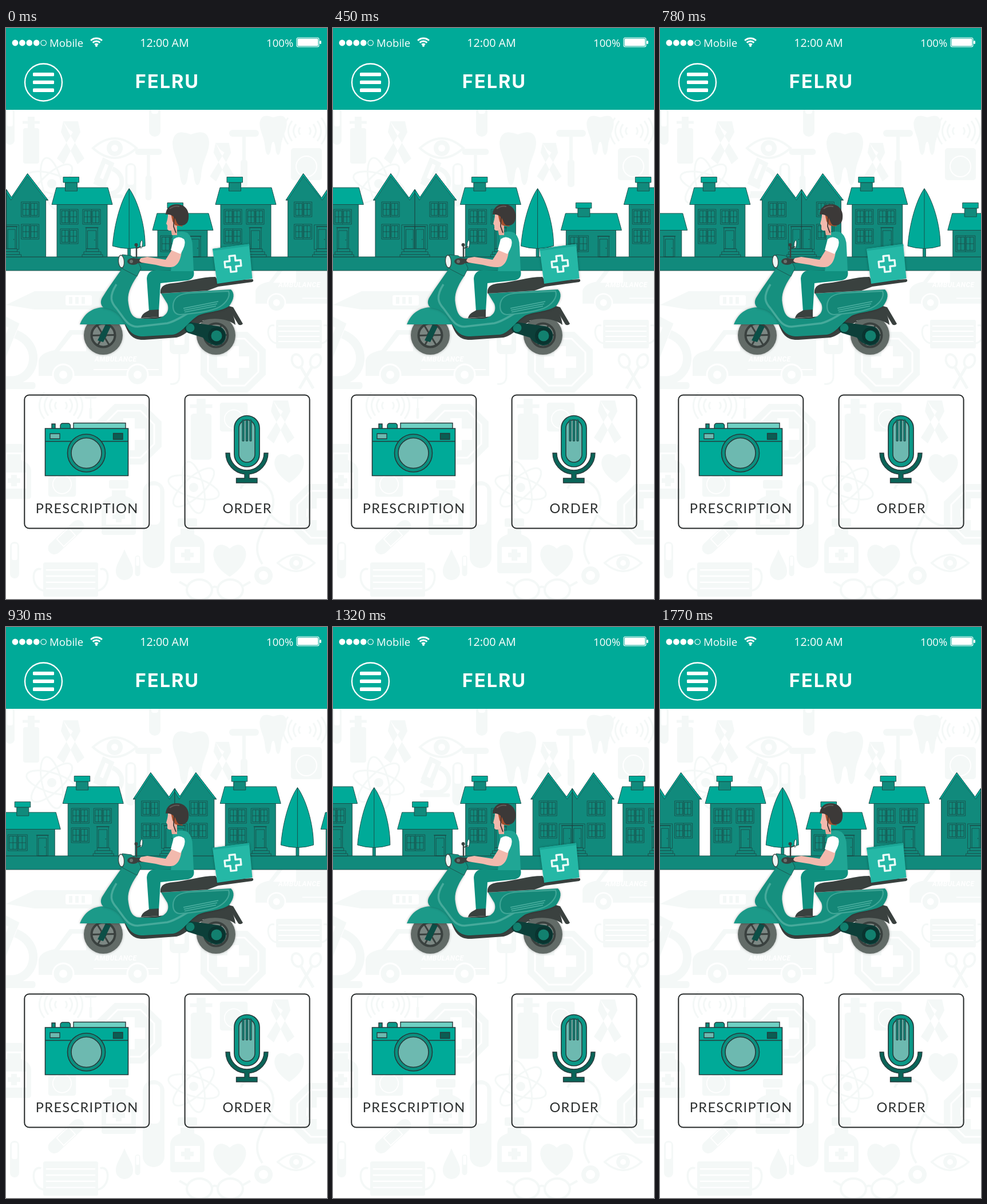
Write an HTML page with a canvas that moves like this. It is 561 by 998 pixels and loops after 1.8 s.

```html
<!DOCTYPE html>
<html lang="en">
<head>
<meta charset="utf-8">
<title>Delivery</title>
<style>
html, body { margin: 0; width: 100%; height: 100%; overflow: hidden; background: #fff; }
canvas, svg { position: absolute; left: 0; top: 0; width: 561px; height: 998px; display: block; }
.status { font: 18.6px "Open Sans", "Noto Sans", sans-serif; fill: #fff; }
.clock { font-size: 19.7px; }
.title { font: 700 32.5px Inter, sans-serif; fill: #fff; letter-spacing: 2px; }
.label { font: 23.6px Lato, sans-serif; fill: #2c2f2f; letter-spacing: 1.3px; }
.van { font: italic 700 12px Roboto, sans-serif; fill: #fff; letter-spacing: .4px; }
</style>
</head>
<body>
<canvas id="c" width="561" height="998"></canvas>
<svg viewBox="0 0 561 998">
  <text class="status" x="76" y="33">Mobile</text>
  <text class="status clock" x="277" y="33" text-anchor="middle">12:00 AM</text>
  <text class="status" x="455" y="33">100%</text>
  <text class="title" x="282" y="105" text-anchor="middle">FELRU</text>
  <text class="label" x="141.7" y="848" text-anchor="middle">PRESCRIPTION</text>
  <text class="label" x="421.7" y="847.5" text-anchor="middle">ORDER</text>
  <text class="van" x="155" y="583">AMBULANCE</text>
  <text class="van" x="476" y="453">AMBULANCE</text>
</svg>
<script>
const W = 561, H = 998, STEP = 30, FRAMES = 60, SPEED = 560 / 59;
const TEAL = '#00aa98', WALL = '#118a7c', INK = '#1b4845', DARK = '#3a413f';
const BODY = '#16907f', PALE = '#f4f8f7', GLASS = '#6db9b0', LINE = '#27393a';
const SKIN = '#f2b9ad';
const screen = document.getElementById('c').getContext('2d');
let g = screen;

function paint(path, fill, stroke, w = 1) {
  if (fill) { g.fillStyle = fill; g.fill(path); }
  if (stroke) { g.strokeStyle = stroke; g.lineWidth = w; g.stroke(path); }
}
const shape = (d, fill, stroke, w) => paint(new Path2D(d), fill, stroke, w);
function rect(x, y, w, h, fill, stroke, lw, r = 0) {
  const p = new Path2D();
  p.roundRect(x, y, w, h, r);
  paint(p, fill, stroke, lw);
}
function oval(x, y, rx, ry, fill, stroke, lw, turn = 0) {
  const p = new Path2D();
  p.ellipse(x, y, rx, ry, turn, 0, 7);
  paint(p, fill, stroke, lw);
}
const circle = (x, y, r, fill, stroke, lw) => oval(x, y, r, r, fill, stroke, lw);
function at(x, y, s, draw, turn = 0) {
  g.save();
  g.translate(x, y);
  g.rotate(turn);
  g.scale(s, s);
  draw();
  g.restore();
}
function shaded(draw) {
  g.save();
  g.shadowColor = 'rgba(0,0,0,.3)';
  g.shadowBlur = 4;
  draw();
  g.restore();
}

// Pale medical pattern
const icon = {
  ribbon() {
    shape('M-13-37H13L17-18L-12 38L-24 28L4-18L-4-24ZM-13-37L-17-18L12 38L24 28L-4-18Z', PALE);
  },
  eye() {
    shape('M-38 0Q0-34 38 0Q0 34-38 0Z', null, PALE, 4);
    circle(0, 0, 14, PALE);
    circle(0, 0, 6, '#fff');
  },
  tooth() {
    shape('M-32-30C-28-54-10-46 0-43C10-46 30-54 32-30C32-8 20 0 18 30C15 52 7 50 5 28C3 10-3 10-5 28C-7 50-16 52-19 30C-21 0-32-8-32-30Z', PALE);
  },
  hammer() {
    rect(-26, 0, 52, 12, PALE, null, 0, 6);
    rect(-3, 12, 6, 42, PALE);
    rect(-6, 52, 12, 48, PALE, null, 0, 5);
  },
  atom() {
    for (let i = 0; i < 3; i++) oval(0, 0, 46, 17, null, PALE, 3, i * Math.PI / 3 + .3);
    circle(0, 0, 8, PALE);
  },
  heart() { shape('M0 29C-50-3-24-43 0-20C24-43 50-3 0 29Z', PALE); },
  bottle() {
    rect(-17, -48, 34, 15, PALE, null, 0, 3);
    shape('M-12-30H12V-20Q30-14 30 0V43Q30 48 25 48H-25Q-30 48-30 43V0Q-30-14-12-20Z', PALE);
    rect(-22, 2, 44, 28, '#fff');
    shape('M-5 6H5V12H11V20H5V26H-5V20H-11V12H-5Z', PALE);
  },
  syringe() {
    rect(-14, -20, 28, 62, PALE, null, 0, 4);
    rect(-6, -40, 12, 20, PALE);
    shape('M-15-30H15', null, PALE, 5);
  },
  octagon() {
    shape('M-25-53H25L57-22V22L25 53H-25L-57 22V-22Z', PALE);
    shape('M-20-41H20L44-17V17L20 41H-20L-44 17V-17Z', null, '#fff', 3);
    shape('M-10-28H10V-10H28V10H10V28H-10V10H-28V-10H-10Z', '#fff');
  },
  mask() {
    shape('M-43-15C-58-20-58 12-40 16M43-15C58-20 58 12 40 16', null, PALE, 3);
    rect(-40, -25, 80, 50, PALE, null, 0, 3);
    for (let y = -14; y < 20; y += 9) shape(`M-36 ${y}H36`, null, '#fff', 2);
  },
  microscope() {
    shape('M-8-38L8-30L-8 10L-24 2ZM-30 8L-4 20M10-20C40-8 35 30 8 34H-25', null, PALE, 10);
    rect(-33, 36, 66, 8, PALE, null, 0, 3);
  },
  van() {
    shape('M-108 35V8Q-104-6-80-10L-54-45H95Q108-45 108-32V35Z', PALE);
    shape('M-72-8L-49-37H-25V-8Z', '#fff');
    shape('M-12 24H102', null, '#fff', 2);
    for (const x of [-65, 65]) { circle(x, 33, 18, PALE, '#fff', 3); circle(x, 33, 7, '#fff'); }
  },
  thermo() {
    shape('M-110 8L-60-16H62Q84-16 84 0Q84 16 62 16H-60Z', PALE);
    rect(-6, -9, 46, 18, '#fff', null, 0, 3);
    for (let x = 0; x < 32; x += 11) rect(x, -6, 6, 12, PALE);
  },
  tube() {
    rect(-10, -40, 20, 80, PALE, null, 0, 10);
    rect(-6, -36, 12, 36, '#fff', null, 0, 4);
  },
  scissors() {
    shape('M-12 30L10-8M12 30L-10-8', null, PALE, 5);
    oval(-16, -18, 9, 12, null, PALE, 4, -.4);
    oval(16, -18, 9, 12, null, PALE, 4, .4);
  },
  waves() {
    for (let r = 8; r < 32; r += 7) {
      shape(`M${-r} ${-r * .8}Q${-r * 1.6} 0 ${-r} ${r * .8}M${r} ${-r * .8}Q${r * 1.6} 0 ${r} ${r * .8}`, null, PALE, 3);
    }
  },
  monitor() {
    rect(-27, -28, 54, 56, PALE, null, 0, 5);
    circle(0, 4, 18, PALE, '#fff', 2);
  },
  bandage() {
    rect(-39, -11, 78, 22, PALE, null, 0, 11);
    rect(-14, -9, 28, 18, null, '#fff', 2);
  },
  drop() { shape('M0-30C7-12 15-4 15 9A15 15 0 0 1-15 9C-15-4-7-12 0-30Z', PALE); },
  glasses() {
    oval(-27, 0, 22, 18, null, PALE, 4);
    oval(27, 0, 22, 18, null, PALE, 4);
    shape('M-6-3Q0-8 6-3M-48-6L-62-14M48-6L62-14', null, PALE, 4);
  },
  bag() {
    rect(-17, -28, 34, 48, PALE, null, 0, 8);
    shape('M0 20V58Q0 74-16 72', null, PALE, 3);
    rect(-9, -16, 18, 20, '#fff', null, 0, 3);
  }
};
const pattern = `syringe 44 195 1;ribbon 113 200 1;eye 190 210 1;tube 260 150 1;hammer 249 211 .9;tooth 323 229 1;
ribbon 378 234 .9;hammer 416 178 1;tooth 467 188 .74;waves 522 180 1;monitor 525 238 1;atom 80 272 1;microscope 178 262 .8;
tube 218 274 .95;tube 7 172 .8;thermo 110 476 1;van 528 452 .85;
mask 512 535 1;van 165 573 1;microscope 2 565 1.5;octagon 397 584 1;bag 303 550 1;scissors 525 600 1;waves 96 660 1;
hammer 148 643 .4;octagon 215 710 1;syringe 341 700 1.3;ribbon 480 688 1;monitor 398 680 .9;heart 495 769 .9;
atom 328 803 1;bottle 14 775 1;monitor 98 794 .9;bottle 197 838 1;octagon 553 850 1;tube 258 868 1.9;tube 15 930 .8;
bottle 317 905 1;heart 391 930 1;drop 207 941 1;mask 113 964 1.2;eye 507 935 .85;glasses 365 982 1;tube 230 940 .45`
  .split(';').map(s => s.trim().split(' '));

function backdrop() {
  g.fillStyle = '#fff';
  g.fillRect(0, 0, W, H);
  for (const [name, x, y, s] of pattern) at(+x, +y, +s, icon[name]);
  at(105, 890, 1, icon.bandage, -.75);
  shape('M410 805C425 770 485 800 462 850C440 895 430 910 448 937M462 850C485 880 535 880 530 835', null, PALE, 4);
  circle(450, 957, 16, PALE);
  circle(450, 957, 8, '#fff');
}

// Street
function pane(x, y, w, h) {
  rect(x, y, w, h, null, INK, .8);
  shape(`M${x + w / 2} ${y}v${h}M${x} ${y + h / 2}h${w}`, null, INK, .8);
}
function windows(x, y, w = 31, h = 26) {
  rect(x, y, w, h, null, INK, .8);
  pane(x + 2.5, y + 2.5, w / 2 - 4, h - 5);
  pane(x + w / 2 + 1.5, y + 2.5, w / 2 - 4, h - 5);
  shape(`M${x + w / 2} ${y}v${h}`, null, INK, .8);
}
function door(x, y, w, h) {
  rect(x, y, w, h, null, INK, .8);
  rect(x + 2.5, y + 5, w - 5, h - 5, null, INK, .8);
  shape(`M${x - 1.5} ${y}h${w + 3}`, null, INK, 1.2);
  circle(x + w - 5, y + h * .58, .8, INK);
}
function steps(x, y, w) {
  rect(x + 4, y, w - 8, 5, WALL, INK, .8);
  rect(x, y + 5, w, 5, WALL, INK, .8);
  rect(x - 3, y + 10, w + 6, 4, WALL, INK, .8);
}
function roof(y, chimney) {
  shape(`M8 ${y}H98L106 ${y + 29.5}H0Z`, TEAL, INK, .9);
  rect(chimney + 3.5, y - 9, 21, 15, WALL, INK, .9);
  rect(chimney, y - 18.5, 27.5, 9.5, TEAL, INK, .9);
}
function tallHouse() {
  rect(9, 308, 88, 92, WALL, INK, .9);
  roof(279, 20);
  windows(15, 317);
  windows(54, 317);
  windows(15, 351);
  door(60, 349, 20, 37);
  steps(56, 386, 30);
}
function lowHouse() {
  rect(9, 353, 87, 47, WALL, INK, .9);
  roof(324, 26);
  windows(14, 363, 34, 28);
  door(65, 364, 19, 36);
}
function twinHouse() {
  shape('M-69 301H-72.5L-42 254.5L-10 297L0 282L9 296L37 254.5L73 301H69V400H-69Z', WALL, INK, .9);
  shape('M-72.5 301L-42 254.5L-10 297L0 282L9 296L37 254.5L73 301L68 299L37 259L8 301L0 288L-9 301L-42 259L-68 299Z', TEAL, INK, .7);
  shape('M0 282V400', null, INK, 1.2);
  for (const y of [304, 343]) {
    windows(-58, y);
    windows(26, y);
  }
  rect(-23, 344, 45, 43, null, INK, .8);
  door(-18, 347, 18, 39);
  door(0, 347, 18, 39);
  steps(-23, 386, 46);
}
function tree() {
  rect(-2.5, 382, 5, 18, WALL, INK, .8);
  shape('M0 280.5C-14 300-26 342-29 381Q0 390 28 381C28 342 14 300 0 280.5Z', TEAL, INK, .9);
  shape('M0 281V386', null, INK, .9);
}
const street = [[.6, twinHouse], [80, tallHouse], [215.2, tree], [256, lowHouse], [366, tallHouse]];

function drawStreet(shift) {
  rect(-2, 400, W + 4, 24, WALL, INK, .9);
  for (const [x, draw] of street) {
    for (let k = -2; k <= 1; k++) {
      const px = x + shift + k * W;
      if (px > -120 && px < W + 90) at(px, 0, 1, draw);
    }
  }
}

// Scooter and rider
function wheel(x) {
  shaded(() => circle(x, 537, 34, '#626b67'));
  circle(x, 537, 20.5, '#7c8783', DARK, 4);
  for (let i = 0; i < 6; i++) at(x, 537, 1, () => rect(-1.5, -20, 3, 20, DARK), i * Math.PI / 3 + .5);
  circle(x, 537, 6, DARK);
}
function scooter() {
  wheel(170);
  wheel(367);
  shape('M174 518L183 522L170 549L160 546Z', '#0c4f47');
  shape('M386 485L397 488L414 517Q410 521 406 518Z', DARK);
  shape('M300 512L386 484C396 497 400 508 401 519C386 506 352 504 330 517Z', DARK);
  shape('M205 510C213 537 222 546 242 545L298 541C318 536 322 522 345 513L330 500Z', DARK);
  shape('M320 514L369 521A17 17 0 0 1 366 555Q352 552 344 541L318 533A10 10 0 0 1 320 514Z', '#0c3f39');
  circle(322, 524, 7.5, '#12806f');
  circle(368, 538, 15, '#0a332f');
  circle(368, 538, 9.5, '#12806f');

  shaded(() => {
    shape('M129 518C136 500 150 488 173 488C194 490 205 502 211 518Z', '#1c9a89');
    shape('M204 419L229 434C217 452 211 466 214 482C217 500 222 508 236 508H262C278 506 287 496 282 482L271 464L393 457C400 463 399 474 390 486C376 496 348 496 335 503C318 514 308 533 292 536L240 539C222 539 216 531 208 517C202 502 190 491 171 489C164 484 165 476 169 470C180 452 192 436 204 419Z', BODY);
  });
  shape('M193 448C179 470 184 480 193 490C207 508 212 522 230 522L282 516C298 512 307 504 318 499', null, '#46aa9b', 3.5);
  shape('M292 486C292 470 304 464 324 463L389 460C393 471 382 484 368 490C348 497 326 499 304 501Q292 500 292 486Z', '#148777', '#40a697', 2.2);
  for (let i = 0; i < 3; i++) shape(`M${310 + i} ${490 + i * 3.3}L${371 - i * 2} ${478 + i * 4}`, null, '#4db0a1', 1.5);

  shape('M270 464C269 451 278 447 292 446C320 443 340 435 366 435L371 443L431 439Q434 442 430 444L371 452L352 459Z', DARK);
  shaded(() => shape('M361 386L425 377.5L430.5 438L369 447Z', '#25b8a6'));
  shape('M361 386L425 377.5L425.5 381L362 389.5Z', '#1ba898');
  at(396.5, 412, 1, () => {
    g.lineJoin = 'round';
    shape('M-5-14H5V-5H14V5H5V14H-5V5H-14V-5H-5Z', null, '#eafaf7', 3.4);
    g.lineJoin = 'miter';
  }, -.1);
}
function rider() {
  shape('M290 424H328Q331 438 318 441L270 446L267 496H250L246 438Q247 424 263 423Z', '#10907f');
  shape('M236 507C238 498 246 496 251 493L267 492V505Z', DARK);
  shape('M291 362Q303 352 317 358Q326 366 326 382L328 425H288L293 392Z', '#20a695');
  shape('M286 341L299 343V362L290 362Z', '#e9aa9c');
  shape('M283 325C283 333 281 338 280 342L282 345L282 352Q286 357 294 351L298 325Z', SKIN);
  shape('M288 324L300 330L309 347L296 345L291 338Z', '#a84f2c');
  shape('M279 326C280 312 290 307 300 308C314 309 321 320 319 333C318 342 312 346 303 345C297 342 298 334 293 330Q287 325 279 326Z', '#3c3938');
  shape('M286 316Q294 310 303 312', null, '#605a57', 2);
  shape('M294 329L293 347L297 358', null, '#3c3938', 1.8);
}
function handlebar() {
  shape('M203 396L219 398Q232 408 236 420L229 434L204 421Z', BODY, INK, .8);
  oval(201.5, 408, 5, 11, '#eef5f3', DARK, 1.2, -.08);
  shape('M228 380V402', null, DARK, 2.5);
  circle(227.5, 379, 3, DARK);
  oval(236.5, 378, 2.2, 7, '#edf6f4', INK, 1, .12);
  shape('M229 385L236 382', null, DARK, 1.5);
  oval(222, 408, 10, 6, DARK);
  rect(222, 403, 23, 8, DARK, null, 0, 4);
  circle(219, 408, 3, '#69736f');
}
function arm() {
  shape('M291 386L307 390Q305 410 295 416Q287 421 262 414L237 410Q230 407 236 402L247 400L279 405Z', SKIN);
  shape('M293 369Q302 362 311 369Q316 377 305 395L288 388Z', '#fff');
}

// Interface
function header() {
  rect(0, 0, W, 143, TEAL);
  for (let i = 0; i < 4; i++) circle(16 + i * 12.4, 26, 5.4, '#fff');
  circle(65.6, 26, 4.8, null, '#fff', 1.1);
  for (let i = 1; i < 4; i++) {
    const p = new Path2D();
    p.arc(158, 32, i * 5 - 1, -2.35, -.79);
    paint(p, null, '#fff', 3);
  }
  circle(158, 31, 2, '#fff');
  rect(508, 17, 39, 16, null, '#fff', 1.1, 3);
  rect(509.5, 18.5, 36, 13, '#fff', null, 0, 1.5);
  rect(548, 22, 3, 6, '#fff', null, 0, 1.5);
  circle(65.5, 95, 32.5, null, '#fff', 2.3);
  for (let i = 0; i < 3; i++) rect(47, 78 + i * 13.8, 37, 6.3, '#fff', null, 0, 1.5);
}
function camera() {
  rect(80, 692, 6, 9, '#0b8a7b', LINE, 1.4);
  rect(95, 691, 17.5, 13, '#0b9a89', LINE, 1.4, 4);
  rect(118, 690.5, 91, 10, '#6fd0c3', LINE, 1.4);
  rect(68.5, 700, 145, 82.5, TEAL, LINE, 1.6);
  shape('M68.5 722.5H213.5', null, LINE, 1.5);
  rect(77, 709, 17, 9, GLASS, LINE, 1.3);
  rect(187.5, 708.5, 16.5, 10.5, '#0a5d53', LINE, 1.3);
  circle(140.5, 743, 33, '#0b9080', LINE, 1.6);
  circle(140.5, 743, 26.5, GLASS, LINE, 1.6);
}
function mic() {
  rect(399, 677.5, 44, 89.5, '#0a9887', LINE, 1.7, 22);
  rect(407, 685, 28, 74, GLASS, LINE, 1.5, 14);
  for (const x of [413, 419.5, 426]) rect(x, 685, 3, 37, '#0b9080', LINE, 1.1, 1);
  shape('M384 743H391A30 30 0 0 0 451 743H458A37 37 0 0 1 425 779.8V787H439V795H402.5V787H417V779.8A37 37 0 0 1 384 743Z', '#0a6458', LINE, 1.3);
}
function ui() {
  header();
  for (const x of [32.3, 312.6]) rect(x, 641.5, 218, 233, null, '#252929', 2, 8);
  camera();
  mic();
}

function layer(draw) {
  const c = document.createElement('canvas');
  c.width = W;
  c.height = H;
  g = c.getContext('2d');
  draw();
  g = screen;
  return c;
}
const back = layer(backdrop);
const front = layer(() => { scooter(); rider(); handlebar(); arm(); ui(); });

const start = performance.now();
let last = -1;
function tick(now) {
  const n = Math.floor(Math.max(0, now - start) / STEP) % FRAMES;
  if (n !== last) {
    last = n;
    g.drawImage(back, 0, 0);
    drawStreet(n * SPEED);
    g.drawImage(front, 0, 0);
  }
  requestAnimationFrame(tick);
}
tick(start);
</script>
</body>
</html>
```
